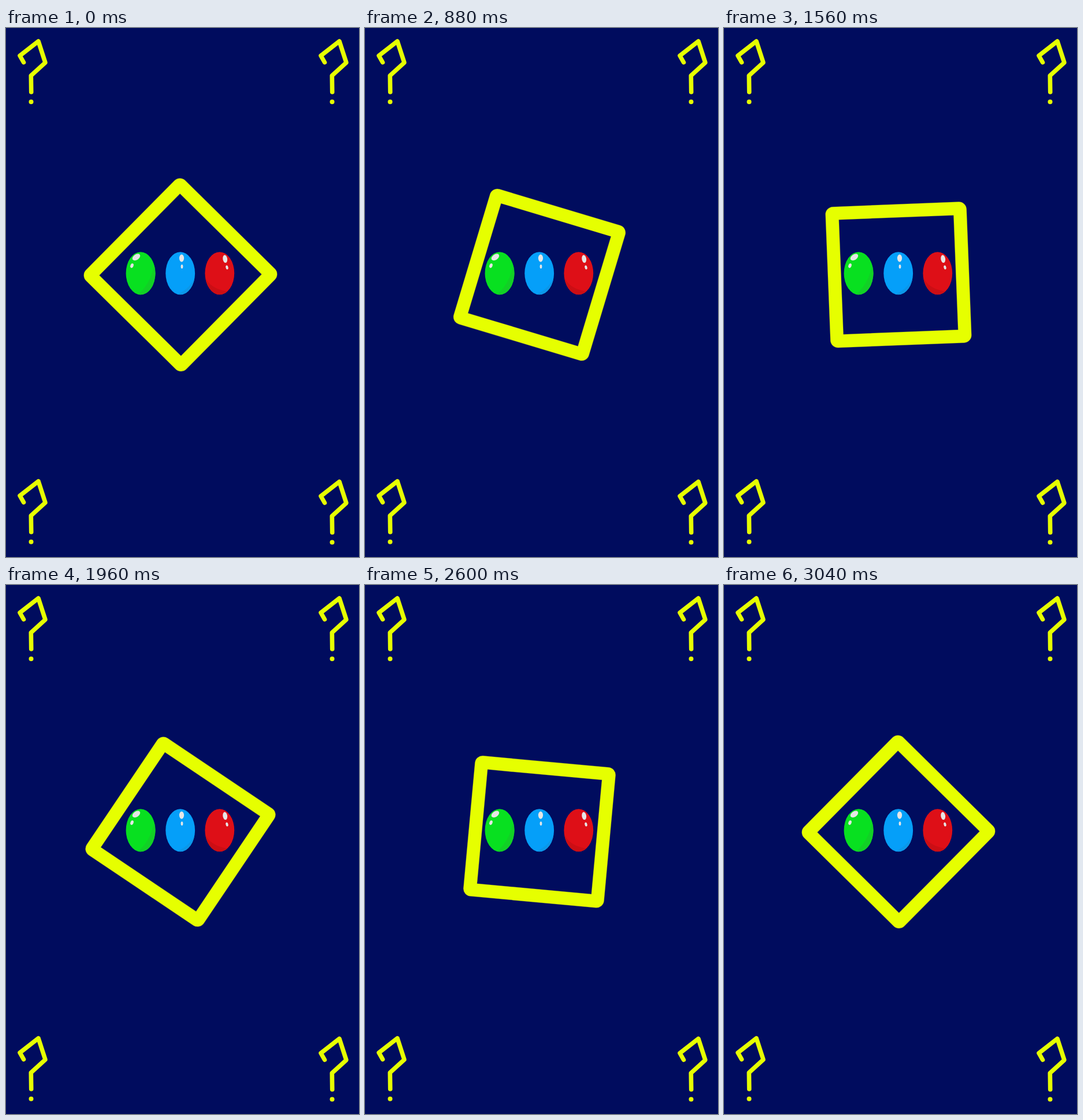
An HTML page for the animation above (3.44 s loop, 611 by 917 pixels).

```html
<!DOCTYPE html>
<html lang="en">
<head>
<meta charset="utf-8">
<title>Turning frame</title>
<style>
  html, body { margin: 0; width: 100%; height: 100%; overflow: hidden; background: #000c5e; }
  svg { display: block; width: 611px; height: 917px; }
</style>
</head>
<body>
<svg viewBox="0 0 611 917">
  <defs>
    <g id="mark">
      <path d="M30.5 59.5 24 48 56 23 68 60 43.3 82.500 43.700 111" fill="none" stroke="#e6ff00"
            stroke-width="7.6" stroke-linecap="round" stroke-linejoin="round"/>
      <circle cx="43.500" cy="128" r="4" fill="#e6ff00"/>
    </g>
    <ellipse id="egg" cy="425.200" rx="25.400" ry="37"/>
  </defs>

  <use href="#mark"/>
  <use href="#mark" x="521"/>
  <use href="#mark" y="762.700"/>
  <use href="#mark" x="521" y="763.500"/>

  <g id="frame" fill="none">
    <rect x="-122.800" y="-122.800" width="245.600" height="245.600" rx="13" stroke="none"/>
    <path id="ring" fill="#e6ff00" fill-rule="evenodd" stroke="#e6ff00" stroke-opacity=".35"
          d="M-109-122H109A13 13 0 0 1 122-109V109A13 13 0 0 1 109 122H-109A13 13 0 0 1-122 109V-109A13 13 0 0 1-109-122ZM-99.500-99.500V99.500H99.500V-99.500Z"/>
  </g>

  <use href="#egg" x="233" fill="#08e020"/>
  <path d="M256.600 411Q250 443 229 461.700A25.400 37 0 0 0 256.600 411Z" fill="#12d026"/>
  <use href="#egg" x="301.700" fill="#059ff9"/>
  <path d="M326.400 433Q318 452 297 461.500A25.400 37 0 0 0 326.400 433Z" fill="#0c97e8"/>
  <use href="#egg" x="369.800" fill="#de0f17"/>
  <path d="M345.100 433Q354 452 383 456.700A25.400 37 0 0 1 345.100 433Z" fill="#cc0e14"/>

  <g fill="#e6e6e6">
    <ellipse rx="7.500" ry="4.700" transform="translate(225.500 397.300) rotate(-35)"/>
    <ellipse rx="2.600" ry="4" transform="translate(218 412) rotate(20)"/>
    <ellipse rx="4.100" ry="6.500" transform="translate(304 399)"/>
    <ellipse rx="1.900" ry="3.500" transform="translate(304.500 413.500)"/>
    <ellipse rx="3.900" ry="6.800" transform="translate(379.200 400.300) rotate(-8)"/>
    <ellipse rx="2.100" ry="3.600" transform="translate(382.500 415) rotate(-12)"/>
  </g>
</svg>
<script>
  const LOOP = 3440, HOLD = 400, STEP = 40, LAST = 67;
  // [step, degrees turned]: quick at first, then an almost even turn
  const keys = [[0, 0], [6, 27.85], [20, 96.3], [30, 133.1], [40, 169.3], [56, 230.6], [LAST, 270]];
  const frame = document.getElementById("frame");

  function turned(step) {
    const i = Math.max(1, keys.findIndex(([s]) => s >= step));
    const [s0, a0] = keys[i - 1], [s1, a1] = keys[i];
    return a0 + (a1 - a0) * (step - s0) / (s1 - s0);
  }

  function draw(now) {
    const t = now % LOOP;
    const step = Math.min(LAST, Math.max(0, Math.floor((t - HOLD) / STEP) + 1));
    frame.setAttribute("transform", `translate(302 427.800) rotate(${turned(step) - 45.35})`);
    requestAnimationFrame(draw);
  }
  draw(performance.now());
</script>
</body>
</html>
```
